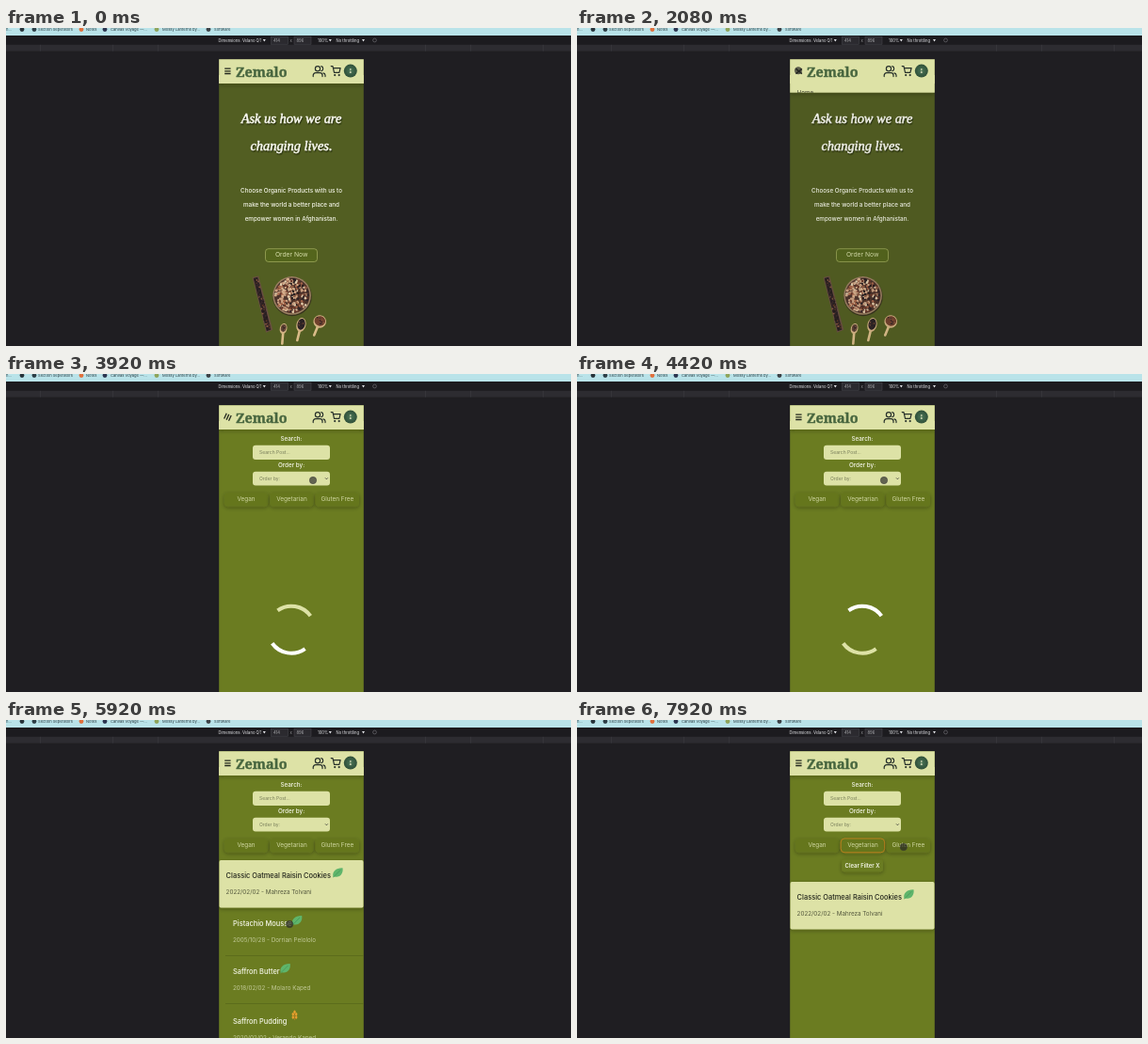
Write an HTML page that moves like this. It is 600 px wide and 338 px high and loops after 8000 ms.

```html
<!DOCTYPE html>
<html lang="en">
<head>
<meta charset="utf-8">
<title>Mobile shop preview</title>
<style>
  html, body { margin: 0; width: 100%; height: 100%; overflow: hidden; background: #1f1e22; }
  svg { display: block; width: 100vw; height: 100vh; }
  text { font-family: Inter, "Open Sans", sans-serif; font-size: 6.3px; }
  .tiny { font-size: 4.1px; fill: #2c3d43; }
  .tool { font-size: 4.2px; fill: #e4e5e8; }
  .mid { text-anchor: middle; }
  .script { font: italic 14.4px "Liberation Serif", serif; fill: #fbfbf2; stroke: #fbfbf2; stroke-width: .4; }
  .logo { font: 900 14.4px "Noto Serif", serif; fill: #48663f; stroke: #48663f; stroke-width: .4; }
  .white { fill: #f6f7ea; }
  .lead { font-weight: 500; }
  .item { fill: #3a3d2a; }
  .label { font-weight: 500; fill: #f6f7ea; }
  .hint { font-size: 5px; fill: #777c59; }
  .chip { font-size: 6.4px; fill: #d0d7a2; }
  .title { font-size: 7.45px; font-weight: 500; }
  .line { fill: none; stroke: #27302a; stroke-width: 1.2; stroke-linecap: round; stroke-linejoin: round; }
</style>
</head>
<body>
<svg viewBox="0 0 600 338" preserveAspectRatio="none">
  <defs>
    <clipPath id="phone"><rect x="226.2" y="33.2" width="153.6" height="305"/></clipPath>
    <clipPath id="menuClip"><rect id="menuCut" x="226" y="59" width="154" height="0"/></clipPath>
    <filter id="shade" x="-20%" y="-30%" width="140%" height="190%">
      <feDropShadow dx="0" dy="1.5" stdDeviation="2.2" flood-color="#1c2208" flood-opacity=".32"/>
    </filter>
    <filter id="deep" x="-20%" y="-30%" width="140%" height="190%">
      <feDropShadow dx="0" dy="5" stdDeviation="4" flood-color="#4a4f22" flood-opacity=".5"/>
    </filter>
    <filter id="textShade" x="-5%" y="-20%" width="110%" height="160%">
      <feDropShadow dx=".8" dy="1.5" stdDeviation=".7" flood-color="#161a08" flood-opacity=".7"/>
    </filter>
    <radialGradient id="face"><stop offset="0" stop-color="#4f7a58"/><stop offset=".6" stop-color="#3a5e46"/><stop offset="1" stop-color="#2f5038"/></radialGradient>
    <g id="leaf">
      <path d="M-4.9 4C-6-1-2-5.2 5.2-5 6.2 1 2.1 5.8-3.6 4.2L-4.9 5.4Z" fill="#5fb56b"/>
      <path d="M-4.5 4.6L3-3" stroke="#3d8f55" stroke-width=".6"/>
    </g>
    <g id="wheat">
      <path d="M0 5V-4" stroke="#b8791d" stroke-width=".8"/>
      <g fill="#e8a02e">
        <ellipse cy="-3.8" rx="1.2" ry="1.8"/>
        <ellipse cx="-1.7" cy="-1.3" rx="1.2" ry="1.8"/><ellipse cx="1.7" cy="-1.3" rx="1.2" ry="1.8"/>
        <ellipse cx="-1.7" cy="2" rx="1.2" ry="1.8"/><ellipse cx="1.7" cy="2" rx="1.2" ry="1.8"/>
      </g>
    </g>
  </defs>

  <rect width="600" height="338" fill="#1f1e22"/>
  <g id="browser"></g>

  <g clip-path="url(#phone)">
    <g id="home">
      <rect x="226" y="33" width="154" height="305" fill="#525e22"/>
      <g class="mid" filter="url(#textShade)">
        <text class="script" x="303" y="101">Ask us how we are</text>
        <text class="script" x="303" y="130">changing lives.</text>
      </g>
      <g class="mid lead">
        <text class="white" x="303" y="174.7">Choose Organic Products with us to</text>
        <text class="white" x="303" y="189.6">make the world a better place and</text>
        <text class="white" x="303" y="204.5">empower women in Afghanistan.</text>
      </g>
      <rect x="275.5" y="234.7" width="55" height="13.8" rx="3.2" fill="#54651c" stroke="#b6c06e" stroke-width=".6"/>
      <text class="mid" x="303.2" y="243" style="font-size:6.75px;fill:#d5dca8">Order Now</text>
      <g id="spices"></g>
      <rect id="dim" x="226" y="33" width="154" height="305" fill="#202022" opacity="0"/>
    </g>

    <g id="blog">
      <rect x="226" y="33" width="154" height="305" fill="#6b7c21"/>
      <g class="mid">
        <text class="label" x="303" y="71.2">Search:</text>
        <text class="label" x="303" y="99.4">Order by:</text>
      </g>
      <g fill="#dde2a6">
        <rect x="262" y="75.7" width="82" height="15.2" rx="3"/>
        <rect x="262" y="103.8" width="82" height="14.6" rx="3"/>
      </g>
      <text class="hint" x="269" y="85">Search Post...</text>
      <text class="hint" x="269" y="112.8">Order by:</text>
      <path d="M339 110.4l1.4 1.4 1.4-1.4" fill="none" stroke="#333" stroke-width=".8"/>
      <g id="chips"></g>
      <g id="spinner" fill="none" stroke-width="4">
        <path id="arcTop" stroke="#dde2a6"/>
        <path id="arcBottom" stroke="#fff"/>
      </g>
      <g id="clear">
        <rect x="281" y="148.6" width="44" height="12.6" rx="3" fill="#6b7c21" filter="url(#shade)"/>
        <text class="mid white" x="303" y="157" style="font-size:5.9px;font-weight:600">Clear Filter X</text>
      </g>
      <g id="posts"></g>
    </g>

    <rect id="menuBack" x="226" y="50" width="154" height="9" fill="#dde2a6" filter="url(#shade)"/>
    <g id="menu" clip-path="url(#menuClip)"></g>
    <g id="popup">
      <rect x="291.5" y="100" width="84.5" height="44.7" rx="6" fill="#dde2a6" filter="url(#deep)"/>
      <g id="popupText" class="mid">
        <text class="item" x="336" y="113">All Blogs</text>
        <text class="item" x="336" y="133">New Blog</text>
      </g>
    </g>

    <rect x="226" y="33" width="154" height="26" fill="#dde2a6"/>
    <text class="logo" x="244" y="51.7">Zemalo</text>
    <g class="line">
      <circle cx="331" cy="43.2" r="2.6"/>
      <path d="M326.2 51.6v-1.3a2.6 2.6 0 0 1 2.6-2.6h4.6a2.6 2.6 0 0 1 2.6 2.6v1.3M334.8 40.7a2.6 2.6 0 0 1 0 5M339 51.6v-1.3a2.6 2.6 0 0 0-2-2.5"/>
      <path d="M345.2 40.6h1.8l1.5 6.7h5.4l1.2-4.7h-7.6"/>
      <circle cx="349.2" cy="50.1" r=".5"/><circle cx="353.7" cy="50.1" r=".5"/>
    </g>
    <circle cx="365.8" cy="45.6" r="7" fill="url(#face)"/>
    <g fill="#c3cbab"><circle cx="365.8" cy="44" r=".9"/><path d="M364.8 48a1 2.6 0 0 1 2 0z"/></g>
    <g id="bars" stroke="#22271d" stroke-width="1.3"><path d="M-3.2-2.7H3.2M-3.2 0H3.2M-3.2 2.7H3.2"/></g>
    <path id="cross" d="M-2.6-3.2L2.6 3.2M2.6-3.2L-2.6 3.2" stroke="#22271d" stroke-width="1.5"/>
  </g>

  <circle id="cursor" r="3.7" fill="#232323" fill-opacity=".66" stroke="#3a3a35" stroke-opacity=".6" stroke-width=".8"/>
</svg>

<script>
const LOOP = 8000;
const el = id => document.getElementById(id);
const text = (x, y, cls, s, extra = "") => `<text x="${x}" y="${y}" class="${cls}" ${extra}>${s}</text>`;
const rect = (x, y, w, h, fill, extra = "") => `<rect x="${x}" y="${y}" width="${w}" height="${h}" fill="${fill}" ${extra}/>`;
const dot = (x, y, r, fill) => `<circle cx="${x}" cy="${y}" r="${r}" fill="${fill}"/>`;
const show = (id, on) => el(id).setAttribute("display", on ? "inline" : "none");
const set = (id, name, value) => el(id).setAttribute(name, value);

function seeded(seed) {
  return () => (seed = (seed * 16807) % 2147483647) / 2147483647;
}

function drawBrowser() {
  const marks = [[17, "#26333a"], [30, "#2d3e46"], [80, "#e0703c"], [105, "#2c3550"], [160, "#8ea45a"], [215, "#3b4146"]];
  const links = [[0, "n..."], [34, "Section Seperators"], [85, "Notes"], [111, "Canvas Voyage —..."], [166, "Mossy Lanterns by..."], [221, "Software"]];
  const arrow = x => `<path d="M${x} 12h3l-1.5 2.4z" fill="#dfe0e4"/>`;
  let s = rect(0, 0, 600, 8, "#b9e3e9");
  marks.forEach(([x, c]) => s += dot(x, 1.6, 2.4, c));
  links.forEach(([x, t]) => s += text(x, 3.2, "tiny", t));
  s += rect(0, 8, 600, 10, "#1c1b1f") + rect(0, 17.8, 600, 6.8, "#2d2c31");
  [36, 113, 161, 445, 493, 570].forEach(x => s += rect(x, 17.8, .7, 6.8, "#3b3a40"));
  const field = 'stroke="#4b4a50" stroke-width=".5"';
  s += rect(281.5, 9.2, 18, 8, "#2b2a2f", field) + rect(306, 9.2, 18, 8, "#2b2a2f", field);
  s += text(225.5, 14.8, "tool", "Dimensions: Velano QT") + arrow(272.8);
  s += text(284, 14.8, "tool", "414", 'opacity=".7"') + text(301.5, 14.6, "tool", "x", 'opacity=".6"') + text(308.5, 14.8, "tool", "896", 'opacity=".7"');
  s += text(331, 14.8, "tool", "100%") + arrow(342.8);
  s += text(350.5, 14.8, "tool", "No throttling") + arrow(378);
  s += '<circle cx="391.5" cy="13" r="1.9" fill="none" stroke="#77767c" stroke-width=".6"/>';
  el("browser").innerHTML = s;
}

function drawSpices() {
  const rnd = seeded(71);
  const dark = ["#241a1c", "#3b2a2a", "#5a3426", "#2b2326", "#8d5a42"];
  const light = ["#c99f80", "#e3cfae", "#a5664a", "#d8b08c", "#6d3b2c"];
  const pick = list => list[Math.floor(rnd() * list.length)];
  const scatter = (cx, cy, r, count, size, tone) => {
    let s = "";
    for (let i = 0; i < count; i++) {
      const a = rnd() * 6.283, d = Math.sqrt(rnd()) * r;
      const x = cx + d * Math.cos(a), y = cy + d * Math.sin(a);
      s += dot(x.toFixed(1), y.toFixed(1), size, tone(x));
    }
    return s;
  };
  const scoop = (cx, cy, rx, ry, hx, hy, fill) =>
    `<path d="M${cx} ${cy}L${hx} ${hy}" stroke="#d9bb88" stroke-width="2.6" stroke-linecap="round"/>` +
    `<g transform="rotate(14 ${cx} ${cy})"><ellipse cx="${cx}" cy="${cy}" rx="${rx}" ry="${ry}" fill="#d3b283"/>` +
    `<ellipse cx="${cx}" cy="${cy - .6}" rx="${rx - 1}" ry="${ry - 1.6}" fill="${fill}"/></g>` +
    scatter(cx, cy - .6, rx - 2, 12, .7, () => pick(dark));

  let s = '<path d="M261.6 265l6.6-1.6 15 57.4-7 3z" fill="#695040"/><path d="M262.8 266l4.4-1.2 14.2 55.6-4.6 1.8z" fill="#2a2022"/>';
  for (let i = 0; i < 60; i++) {
    const p = rnd();
    s += dot((265.4 + p * 13.6 + (rnd() - .5) * 4.4).toFixed(1), (267 + p * 53).toFixed(1), .9, pick(dark));
  }
  s += dot(303.9, 285.4, 20.8, "#37331c") + dot(303.6, 284.4, 20.3, "#9c8062") + dot(303.6, 284.4, 18.8, "#4c332b");
  // pale beans gather on the left of the bowl
  s += scatter(303.6, 284.4, 17.8, 330, 1.25, x => pick(rnd() < .72 - (x - 303.6) * .018 ? light : dark));
  s += scoop(294.6, 319.5, 3.8, 5.6, 293.3, 335.5, "#5d4434");
  s += scoop(313.4, 315.5, 5, 7.6, 309.3, 332, "#2a2224");
  s += scoop(333.2, 312, 6.8, 6.8, 327.2, 326.5, "#70402c");
  el("spices").innerHTML = s;
}

function drawMenu() {
  let s = "";
  ["Home", "Organic Products", "Blogs", "About Us", "Contact Us"].forEach((t, i) => {
    const y = 68.9 + i * 19.65;
    s += text(233.6, y + 2.1, "item", t);
    if (i < 4) s += rect(232, y + 9.6, 142, .4, "#c6cc8d");
  });
  s += '<path d="M254.5 106.5v2h-2.2m.9-.9l-.9.9.9.9" fill="none" stroke="#3a3d2a" stroke-width=".6"/>';
  el("menu").innerHTML = s;
}

function drawChips() {
  el("chips").innerHTML = ["Vegan", "Vegetarian", "Gluten Free"].map((t, i) => {
    const x = 231.8 + i * 48.4;
    return rect(x, 126, 46.4, 14.8, "#65761f", `rx="4" filter="url(#shade)" ${i === 1 ? 'id="picked"' : ""}`) +
      text(x + 23.2, 134.6, "chip mid", t);
  }).join("");
}

function drawPosts() {
  const more = [
    ["Pistachio Mousse", "2005/10/28 - Dorrian Pelololo", 216, 309, "leaf"],
    ["Saffron Butter", "2018/02/02 - Molaro Kaped", 267, 296.5, "leaf"],
    ["Saffron Pudding", "2020/02/02 - Verando Kaped", 320, 306.5, "wheat"]
  ];
  let s = '<g id="others">';
  more.forEach(([name, by, y, ix, icon]) => {
    s += text(241, y + 2.5, "title white", name) + text(241, y + 20, "", by, 'fill="#c2ca98"');
    s += `<use href="#${icon}" x="${ix}" y="${y - (icon === "leaf" ? 3 : 6)}"/>` + rect(233, y + 34.2, 147, .7, "#566619");
  });
  s += "</g>" + rect(226.4, 149, 153.2, 50.4, "#dde2a6", 'rx="2" filter="url(#shade)"');
  s += text(233.6, 167.5, "title", "Classic Oatmeal Raisin Cookies", 'fill="#20231a"');
  s += text(233.6, 185.2, "", "2022/02/02 - Mahreza Tolvani", 'fill="#54583d"');
  s += '<use href="#leaf" x="352.3" y="162.3"/>';
  el("posts").innerHTML = s;
}

function arc(from, to) {
  const at = deg => `${25 * Math.cos(deg * Math.PI / 180)} ${25 * Math.sin(deg * Math.PI / 180)}`;
  return `M${at(from)}A25 25 0 0 1 ${at(to)}`;
}

const clamp = v => Math.max(0, Math.min(1, v));
const ramp = (t, a, b) => clamp((t - a) / (b - a));
const ease = p => p * p * (3 - 2 * p);

// time, x, y
const path = [
  [840, 414, 98], [1250, 322, 78], [1670, 235, 45.3], [2300, 235, 45.3], [2900, 249, 111], [3280, 249, 111],
  [3600, 326, 113], [4800, 326, 113], [5300, 305, 249], [5640, 305, 249], [6420, 292, 141],
  [7260, 292, 141], [7560, 315, 160], [7900, 346.8, 135]
];

function cursorAt(t) {
  const i = path.findIndex(k => k[0] > t);
  if (i < 0) return path[path.length - 1].slice(1);
  if (i === 0) return path[0].slice(1);
  const [a, b] = [path[i - 1], path[i]];
  const p = ease(ramp(t, a[0], b[0]));
  return [a[1] + (b[1] - a[1]) * p, a[2] + (b[2] - a[2]) * p];
}

function render(t) {
  const onBlog = t >= 3750;
  const loaded = t >= 4500;
  const filtered = t >= 6830;
  const open = ease(ramp(t, 1980, 2500)) * (1 - ease(ramp(t, 3650, 3840)));

  show("home", !onBlog);
  show("blog", onBlog);
  set("dim", "opacity", .5 * open);
  set("menuBack", "height", 9 + 98 * open);
  set("menuCut", "height", 98 * open);

  set("popup", "opacity", ramp(t, 3030, 3200) * (1 - ramp(t, 3650, 3750)));
  set("popupText", "opacity", ramp(t, 3150, 3420));

  const crossed = t >= 2080 && t < 3840;
  const turn = t < 3000 ? 90 * ramp(t, 1960, 2080) : -90 * (1 - ramp(t, 3840, 4140));
  show("bars", !crossed);
  show("cross", crossed);
  set("bars", "transform", `translate(235.4 45.8) rotate(${turn})`);
  set("cross", "transform", `translate(235.7 46) rotate(${-90 * (1 - ease(ramp(t, 2080, 2300)))})`);

  show("spinner", !loaded);
  set("spinner", "transform", `translate(303 271.7) rotate(${9 + (t - 3920) * .36})`);
  show("posts", loaded);
  show("others", !filtered);
  show("clear", filtered);
  set("posts", "transform", `translate(0 ${filtered ? 23 : 0})`);
  set("picked", "stroke", t >= 6750 ? "#b8801f" : "none");

  const [x, y] = cursorAt(t);
  set("cursor", "transform", `translate(${x} ${y})`);
  show("cursor", t >= 880);
}

drawBrowser();
drawSpices();
drawMenu();
drawChips();
drawPosts();
set("arcTop", "d", arc(-135, -45));
set("arcBottom", "d", arc(45, 135));

const start = performance.now();
function tick() {
  render((performance.now() - start) % LOOP);
  requestAnimationFrame(tick);
}
tick();
</script>
</body>
</html>
```
